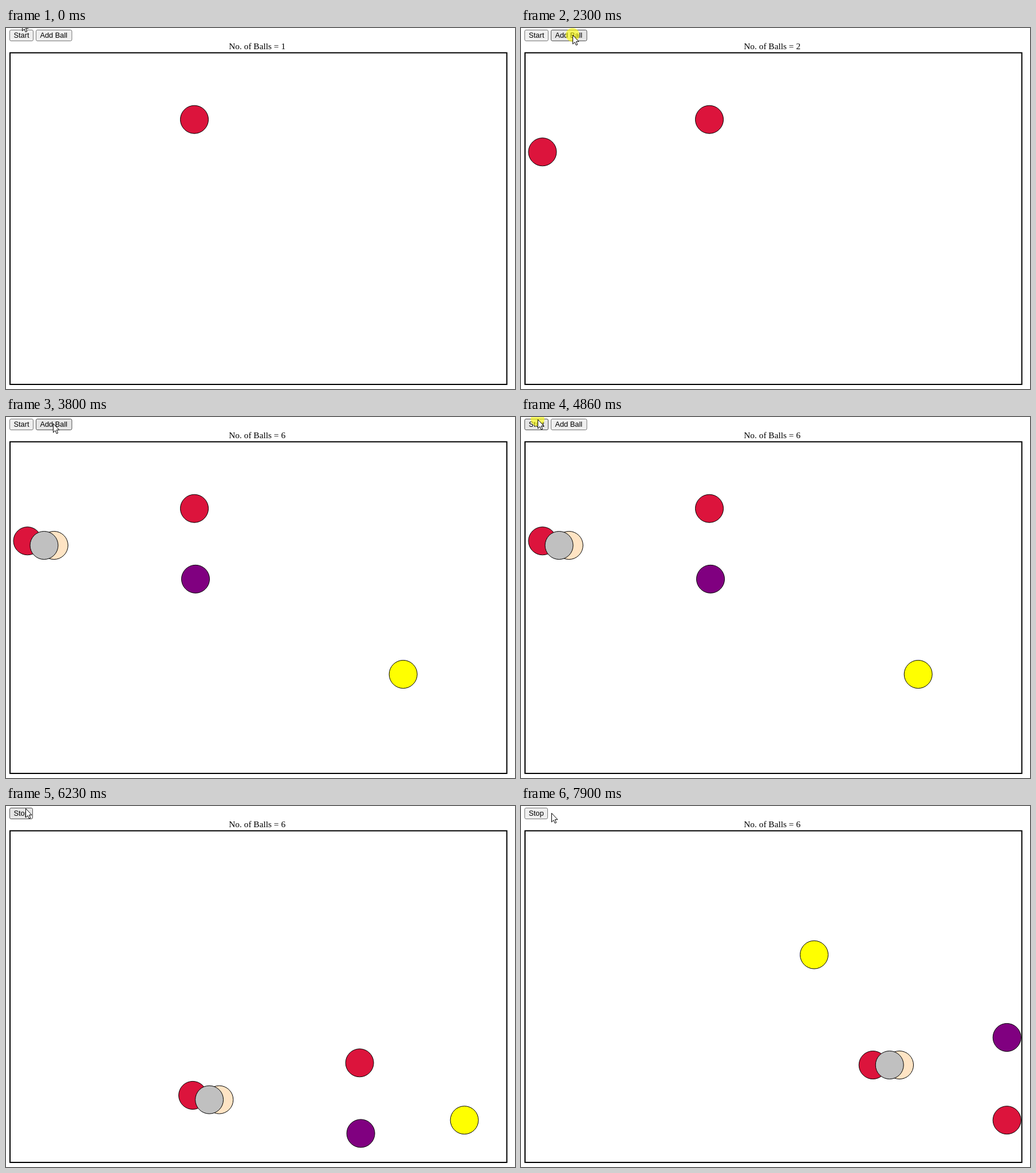
Recreate the animation shown at these times as an HTML page with a canvas. Size 889 px wide and 630 px high, loop 8 s.

```html
<!DOCTYPE html>
<html lang="en">
<head>
<meta charset="utf-8">
<title>Bouncing balls</title>
<style>
html, body { margin: 0; width: 100%; height: 100%; overflow: hidden; background: #fff; }
canvas { display: block; }
</style>
</head>
<body>
<canvas id="stage" width="889" height="630"></canvas>
<script>
const ctx = document.getElementById('stage').getContext('2d');
const LOOP = 8000, STEP = 48.1, MAX_X = 848.7, MAX_Y = 596.3;
const START_UP = 4930;

// colour, x, y, time of appearance
const balls = [
  ['crimson', 329, 159.7, 0],
  ['crimson', 37.5, 216.3, 2270],
  ['purple', 331, 282.8, 2670],
  ['yellow', 693.7, 449, 3080],
  ['bisque', 83.8, 224, 3280],
  ['silver', 66.5, 224, 3480],
];
const addClicks = [2180, 2580, 2990, 3190, 3390];
const clicks = [...addClicks, 4840];
const ticks = [5200, 5370, 5550, 5850, 6030, 6230, 6430, 6630, 6810, 7000, 7190, 7700];

// pointer tip: time, x, y
const path = [
  [0, 28, -11], [40, 28, -11], [220, 21, -11], [780, 46, -9], [860, 46, -9],
  [1610, 86, -1], [1700, 86, -1], [1740, 89, 1], [1900, 89, 1], [2010, 90, 12],
  [3700, 90, 12], [4520, 29, 3], [4539, 29, 3], [4540, 29, 4],
  [5550, 29, 4], [5830, 34, 4], [7190, 34, 4], [7900, 53, 12], [LOOP, 53, 12],
];

function pointerAt(t) {
  const i = path.findIndex(k => k[0] > t);
  const [t0, x0, y0] = path[i - 1], [t1, x1, y1] = path[i];
  const f = (t - t0) / (t1 - t0);
  return [Math.round(x0 + (x1 - x0) * f), Math.round(y0 + (y1 - y0) * f)];
}

// A ball rests at the wall for one extra step before it turns back.
function bounce(from, max, n) {
  const hit = Math.ceil((max - from) / STEP);
  if (n < hit) return from + n * STEP;
  return max - Math.max(0, n - hit - 1) * STEP;
}

function text(s, x, y, font) {
  ctx.font = font;
  ctx.fillStyle = '#000';
  ctx.fillText(s, x, y);
}

function button(label, x, w, [px, py], pressed) {
  const hover = px >= x && px <= x + w && py > 3 && py < 23;
  const [fill, line] = pressed ? ['#f5f5f5', '#8d8d8d']
    : hover ? ['#e5e5e5', '#4f4f4f'] : ['#efefef', '#767676'];
  ctx.beginPath();
  ctx.roundRect(x + .5, 3.5, w - 1, 19, 2.4);
  ctx.fillStyle = fill;
  ctx.fill();
  ctx.strokeStyle = line;
  ctx.lineWidth = 1;
  ctx.stroke();
  text(label, x + 7.4, 17.4, '12.83px "Liberation Sans", Arial, sans-serif');
}

function disc(x, y, r, fill, outlined) {
  ctx.beginPath();
  ctx.arc(x, y, r, 0, 2 * Math.PI);
  ctx.fillStyle = fill;
  ctx.fill();
  if (!outlined) return;
  ctx.strokeStyle = '#000';
  ctx.lineWidth = 1;
  ctx.stroke();
}

function pointer(x, y) {
  const arrow = new Path2D('M.5 .5V16L4 12.7L6.3 18L8.7 17L6.4 11.7H11Z');
  ctx.save();
  ctx.translate(x, y);
  ctx.fillStyle = '#fff';
  ctx.fill(arrow);
  ctx.strokeStyle = '#000';
  ctx.lineWidth = 1;
  ctx.stroke(arrow);
  ctx.restore();
}

function draw(t) {
  const tip = pointerAt(t);
  const n = ticks.filter(k => k <= t).length;
  const shown = balls.filter(b => b[3] <= t);
  const during = (list, from, to) => list.some(c => t >= c + from && t < c + to);

  ctx.fillStyle = '#fff';
  ctx.fillRect(0, 0, 889, 630);
  if (t < START_UP) {
    button('Start', 6, 42, tip);
    button('Add Ball', 52, 63.5, tip, during(addClicks, 0, 90));
  } else {
    button('Stop', 6, 41, tip);
  }
  text('No. of Balls = ' + shown.length, 389.2, 37, '15.4px "Liberation Serif", "Times New Roman", serif');

  ctx.strokeStyle = '#000';
  ctx.lineWidth = 2;
  ctx.strokeRect(7, 43.3, 867.7, 578.7);
  for (const [fill, x, y] of shown) {
    disc(bounce(x, MAX_X, n), bounce(y, MAX_Y, n), 24.5, fill, true);
  }
  if (during(clicks, 20, 150)) disc(...tip, 12, 'rgba(255,255,0,.6)');
  pointer(...tip);
}

const begin = performance.now();
function frame() {
  draw((performance.now() - begin) % LOOP);
  requestAnimationFrame(frame);
}
frame();
</script>
</body>
</html>
```
